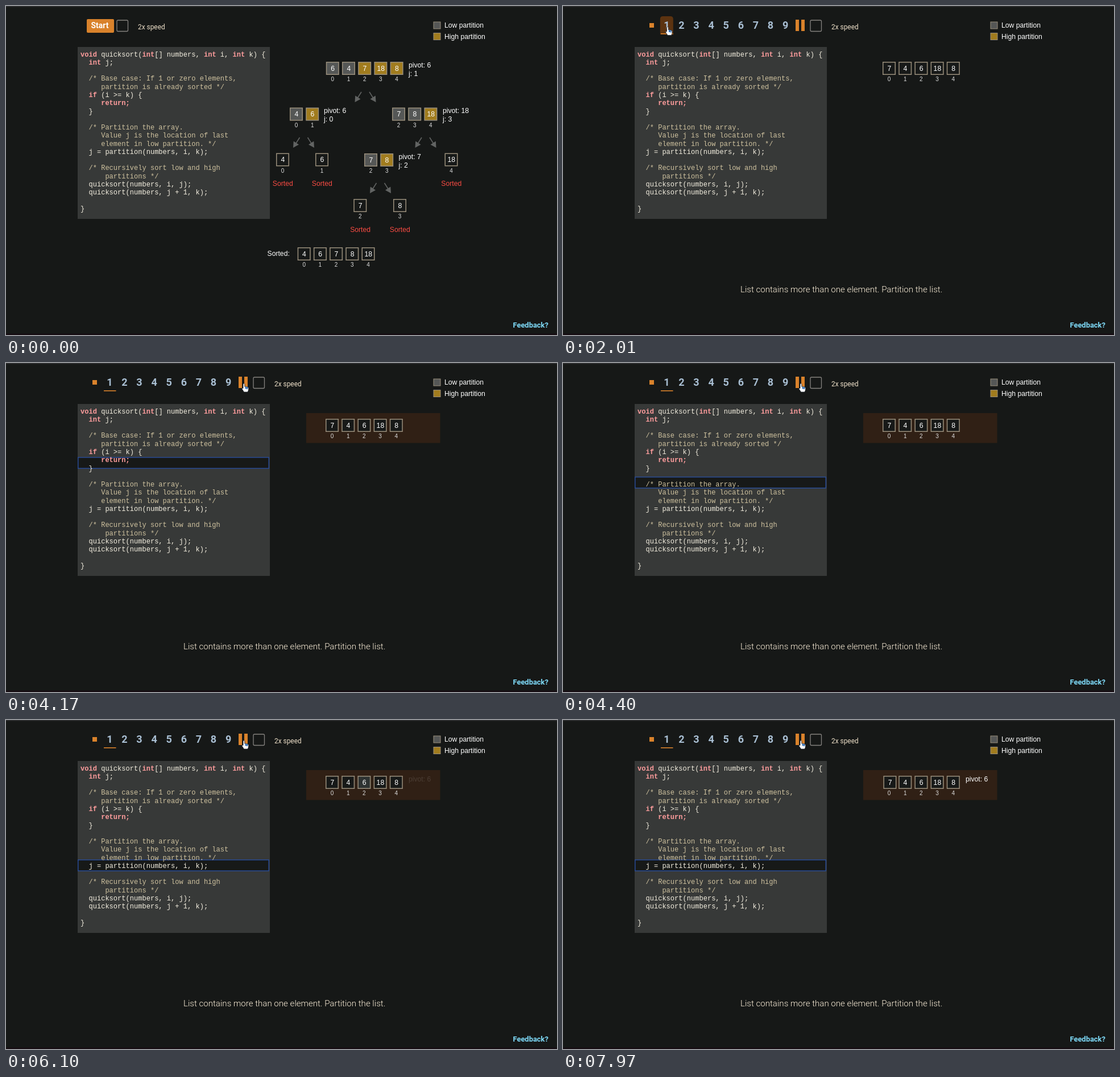
These frames come from a looping animation (969 by 578 pixels, 8000 ms). An HTML page:

```html
<!DOCTYPE html>
<html lang="en">
<head>
<meta charset="utf-8">
<title>Quicksort</title>
<style>
  html, body { margin: 0; width: 100%; height: 100%; overflow: hidden; background: #161817; }
  svg { display: block; width: 969px; height: 578px; }
  text { font: 12.2px "Liberation Sans", Arial, sans-serif; fill: #fff; white-space: pre; }
  .mid { text-anchor: middle; }
  .index { font-size: 10px; fill: #ddd; }
  .sorted { fill: #f94b43; }
  .code { font: 12.05px "Liberation Mono", "Courier New", monospace; fill: #f4efe0; }
  .keyword { font-weight: 700; fill: #ff9d9d; }
  .comment { fill: #cfc29f; }
  .roboto { font-family: Roboto, sans-serif; }
  .step { font-size: 18px; font-weight: 700; fill: #a9bfd3; }
  .note { fill: #eddfc8; }
  .orange { fill: #d9822b; }
  .arrow { stroke: #626463; stroke-width: 1.6; fill: #626463; }
</style>
</head>
<body>
<svg id="stage" viewBox="0 0 969 578"></svg>
<script>
const LOW = '#555756', HIGH = '#a17c1e', DARK = '#171918', BORDER = '#9a8f7c';

const label = (x, y, s, cls = '', extra = '') =>
  `<text x="${x}" y="${y}" class="${cls}" ${extra}>${s}</text>`;
const rect = (x, y, w, h, extra = '') =>
  `<rect x="${x}" y="${y}" width="${w}" height="${h}" ${extra}/>`;

const cell = (x, y, value, fill = DARK, id = '') =>
  `<g ${id && `id="${id}"`}>` +
  rect(x - 10.75, y - 10.75, 21.5, 21.5, `fill="${fill}" stroke="${BORDER}" stroke-width="1.5"`) +
  label(x + 0.3, y + 4.4, value, 'mid') + '</g>';

// A row of cells; the first `low` are gray, the others gold, or all are dark.
function row(x, y, values, first, low = -1, id = '') {
  return values.map((v, i) => {
    const cx = x + i * 28.2;
    const fill = low < 0 ? DARK : i < low ? LOW : HIGH;
    return cell(cx, y, v, fill, id && id + i) + label(cx, y + 22.5, first + i, 'mid index');
  }).join('');
}

const pivot = (x, y, p, j) => label(x, y - 2, `pivot: ${p}`) + label(x, y + 13, `j: ${j}`);

function arrow(x, y, dx) {
  const angle = Math.atan2(18, dx) * 180 / Math.PI;
  return `<g class="arrow"><path d="M${x},${y}l${dx * .7},12.6"/>` +
    `<path stroke="none" d="M0,0L-10,-5.5V5.5z" transform="translate(${x + dx},${y + 18}) rotate(${angle})"/></g>`;
}
const fork = (x, y) => arrow(x - 7, y, -11.5) + arrow(x + 7, y, 11.5);
const leaf = (x, y, value, index) =>
  row(x, y, [value], index) + label(x + .3, y + 46, 'Sorted', 'mid sorted');

const tree =
  row(574.3, 109.5, [6, 4, 7, 18, 8], 0, 2) + pivot(708, 110, 6, 1) + fork(632, 151) +
  row(510.5, 190, [4, 6], 0, 1) + pivot(559, 190, 6, 0) + fork(523.5, 231) +
  row(690.5, 190, [7, 8, 18], 2, 2) + pivot(768, 190, 18, 3) + fork(738, 231) +
  leaf(486.5, 270, 4, 0) + leaf(555.5, 270, 6, 1) +
  row(641.5, 270.5, [7, 8], 2, 1) + pivot(690.5, 271, 7, 2) + leaf(783, 270, 18, 4) +
  fork(658.5, 311) + leaf(622.8, 350.5, 7, 2) + leaf(692.5, 350.5, 8, 3) +
  label(459.5, 439, 'Sorted:') + row(524.2, 435.5, [4, 6, 7, 8, 18], 0);

const source = `void quicksort(int[] numbers, int i, int k) {
  int j;

  /* Base case: If 1 or zero elements,
     partition is already sorted */
  if (i >= k) {
     return;
  }

  /* Partition the array.
     Value j is the location of last
     element in low partition. */
  j = partition(numbers, i, k);

  /* Recursively sort low and high
      partitions */
  quicksort(numbers, i, j);
  quicksort(numbers, j + 1, k);

}`;

function codeLines() {
  let inComment = false;
  return source.split('\n').map((line, i) => {
    inComment = inComment || line.includes('/*');
    const safe = line.replace(/>/g, '&gt;');
    const body = inComment ? safe :
      safe.replace(/\b(void|int|if|return;)/g, '<tspan class="keyword">$1</tspan>');
    const out = label(131, 88.7 + i * 14.26, body, inComment ? 'code comment' : 'code');
    if (line.includes('*/')) inComment = false;
    return out;
  }).join('');
}

const speed = x => rect(x, 25, 19.5, 19.5, 'rx="2" fill="none" stroke="#85827f" stroke-width="1.3"') +
  label(x + 37, 41.2, '2x speed', 'roboto note', 'style="font-size:11.9px"');

const stepX = n => 182.3 + (n - 1) * 26.1;
const hover = (n, id) =>
  `<path id="${id}" fill="#5c3310" d="M${stepX(n) - 11.5},50V23q0,-5 5,-5h13q5,0 5,5V50z"/>`;
const steps = Array.from({length: 9}, (_, i) =>
  label(stepX(i + 1), 40.3, i + 1, 'mid roboto step')).join('');

const idle = rect(142, 23, 48, 24, 'rx="2" class="orange"') +
  label(165, 39, 'Start', 'mid roboto', 'style="font-size:14px;font-weight:700"') + speed(195) + tree;

const running =
  rect(152, 30, 8, 8, 'class="orange"') + hover(1, 'hover1') + hover(7, 'hover7') + steps +
  rect(172, 48, 21.5, 1.6, 'class="orange"') +
  rect(409, 24, 6, 20, 'class="orange"') + rect(419, 24, 6, 20, 'class="orange"') + speed(435) +
  rect(528, 88, 235.5, 52.5, 'id="band" fill="#302015"') +
  row(573.5, 109.5, [7, 4, 6, 18, 8], 0, -1, 'cell') +
  label(708, 108, 'pivot: 6', '', 'id="pivot"') +
  label(312, 503, 'List contains more than one element. Partition the list.', 'roboto note',
    'id="caption" style="font-size:15.08px;font-weight:300;fill:#fff2dc"');

const cursor = `<g id="cursor">
  <path id="pointer" fill="#fff" stroke="#222" d="M0,0V16L4,12.5L6.5,18L9,17L6.5,11.5H11.5z"/>
  <g id="hand"><path fill="#fff" stroke="#1b2027" stroke-width=".8"
    d="M-1.5,1Q0,-1 1.3,1V5.5Q3,4.5 4,6Q5.5,5 6.5,6.7Q8,6.5 8,8V11Q7.5,13 6.5,15H0L-3.5,9.5Q-4,7.5 -1.5,8.5z"/>
    <path stroke="#2769b5" stroke-width="2" d="M3,5.5v4M5.5,6v4"/></g></g>`;

const $ = id => document.getElementById(id);
$('stage').innerHTML =
  rect(0, 0, 969, 578, 'fill="#161817"') + rect(0, 0, 969, 1.5, 'fill="#303132"') +
  rect(0, 575.5, 969, 2.5, 'fill="#160d12"') +
  [[LOW, 'Low', 34], [HIGH, 'High', 53.5]].map(([color, name, y]) =>
    rect(752, y - 6, 12, 12, `fill="${color}" stroke="${BORDER}"`) +
    label(771, y + 4.3, name + ' partition')).join('') +
  rect(126, 72, 338, 302, 'fill="#373938"') +
  rect(126.75, 146.75, 335.5, 19.25, 'id="highlight" fill="#171918" stroke="#294b93" stroke-width="1.5"') +
  codeLines() +
  label(891.5, 564.8, 'Feedback?', 'roboto', 'style="font-size:12.9px;font-weight:700;fill:#7fdcfb"') +
  `<g id="idle">${idle}</g><g id="running">${running}</g>` + cursor;

const ramp = (t, start, length) => Math.min(1, Math.max(0, (t - start) / length));
const swing = (t, start, length = 1000) => .5 - Math.cos(Math.PI * ramp(t, start, length)) / 2;
const show = (id, on) => $(id).setAttribute('display', on ? 'inline' : 'none');
const fade = (id, value) => $(id).setAttribute('opacity', value);

// Cursor tip: time, x, y
const path = [
  [70, 898, 530], [145, 638, 126], [540, 248, 32], [700, 202, 3], [860, 154, 22], [1100, 184, 36.5],
  [2470, 184, 36.5], [2800, 148, 14], [3100, 172, 5], [3340, 190, 4], [3410, 334, 24],
  [3480, 368.5, 31.5], [3710, 418.5, 36], [8000, 418.5, 36]
];
function cursorAt(t) {
  const i = Math.max(1, path.findIndex(p => p[0] > t));
  const [t0, x0, y0] = path[i - 1], [t1, x1, y1] = path[i];
  const k = ramp(t, t0, t1 - t0);
  return [x0 + (x1 - x0) * k, y0 + (y1 - y0) * k];
}

function render(t) {
  const started = t >= 1250;
  show('idle', !started);
  show('running', started);

  const [x, y] = cursorAt(t);
  const overButton = y > 18 && y < 50 && (started ? x > 170 && x < 430 : x < 190);
  show('cursor', t >= 70 && t < 220 || t >= 540);
  show('pointer', !overButton);
  show('hand', overButton);
  $('cursor').setAttribute('transform', `translate(${x},${y})`);

  fade('hover1', ramp(t, 1250, 380) * (1 - ramp(t, 2560, 200)));
  fade('hover7', t < 3410 ? 0 : .32 * (1 - ramp(t, 3410, 150)));
  fade('caption', ramp(t, 1710, 300));
  fade('band', swing(t, 2400));

  const grow = swing(t, 2670), drop = swing(t, 3890, 970);
  show('highlight', grow > 0);
  $('highlight').setAttribute('width', 335.5 * grow);
  $('highlight').setAttribute('y', 146.75 + 99 * drop);

  const glow = swing(t, 4870) - swing(t, 6870);
  const mix = (a, b) => Math.round(a + (b - a) * glow);
  $('cell2').firstChild.setAttribute('fill', `rgb(${mix(23, 46)},${mix(25, 51)},${mix(24, 50)})`);
  fade('pivot', swing(t, 5870));
  $('cell0').setAttribute('transform', `translate(${56.4 * swing(t, 7870)},0)`);
}

function tick(now) {
  render(now % 8000);
  requestAnimationFrame(tick);
}
render(0);
requestAnimationFrame(tick);
</script>
</body>
</html>
```
